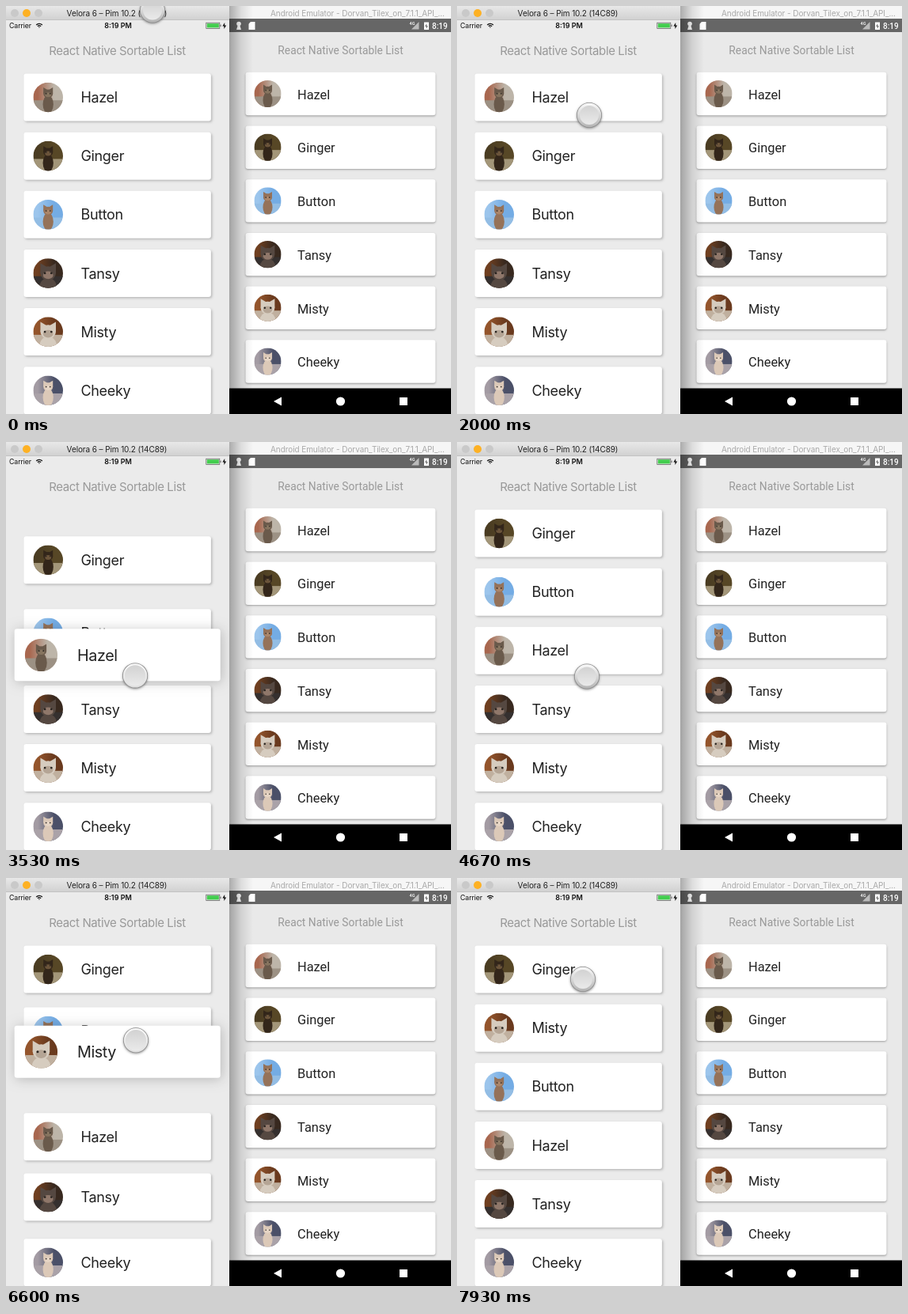
An HTML page with a canvas for the animation above (8 s loop, 562x516 px).

```html
<!DOCTYPE html>
<html lang="en">
<head>
<meta charset="utf-8">
<title>Sortable list</title>
<style>
  html, body { margin: 0; width: 100%; height: 100%; overflow: hidden; background: #ebebeb; }
  canvas { display: block; }
</style>
</head>
<body>
<canvas id="stage" width="562" height="516"></canvas>
<script>
const ctx = document.getElementById('stage').getContext('2d');
const LOOP = 8000, TAU = Math.PI * 2, EDGE = 282, SHIFT = 300;
const SANS = 'Inter, sans-serif', ROBOTO = 'Roboto, sans-serif';
const slot = i => 115.5 + 74.15 * i;

// A track is a start value and steps of [start, end, value].
const clamp = u => Math.max(0, Math.min(1, u));
const ease = u => u < .5 ? 2 * u * u : 1 - 2 * (1 - u) ** 2;
const track = (t, from, steps) => steps.reduce(
  (v, [a, b, to]) => v + (to - v) * ease(clamp((t - a) / (b - a))), from);

function bounce(u) {
  if (u < 1 / 2.75) return 7.5625 * u * u;
  const [mid, base] = u < 2 / 2.75 ? [1.5, .75] : u < 2.5 / 2.75 ? [2.25, .9375] : [2.625, .984375];
  u -= mid / 2.75;
  return 7.5625 * u * u + base;
}

const cats = [
  { name: 'Hazel', wall: '#bdb5a9', side: '#a8674f', floor: '#9c9184', fur: '#6a5a4b', face: '#86745f', sits: true },
  { name: 'Ginger', wall: '#574726', side: '#4a3c22', floor: '#a39679', fur: '#33261a', face: '#6b543a', sits: true },
  { name: 'Button', wall: '#74ace4', side: '#9cc5ec', floor: '#93bde4', fur: '#957259', face: '#ab866a', sits: true },
  { name: 'Tansy', wall: '#38291f', side: '#6f3f20', floor: '#35302f', fur: '#554841', face: '#8f776a' },
  { name: 'Misty', wall: '#6a3a1e', side: '#94552c', floor: '#c0b09f', fur: '#d6ccbf', face: '#b5a595' },
  { name: 'Cheeky', wall: '#4b5068', side: '#a39ba3', floor: '#aaa2a8', fur: '#dcc9b8', face: '#e6d5c5', sits: true }
];

// Each drag lifts the card in one slot; the cards it passes step aside at the swap times.
const drags = [
  { from: 0, to: 2, lift: 2570, drop: 4050, swaps: [3374, 3414], path: [[3060, 3626, 278.5]] },
  { from: 4, to: 1, lift: 5610, drop: 7250, swaps: [6373, 6382, 6553],
    path: [[6100, 6250, 330], [6250, 6705, 207]] }
];
const order = [...cats];
cats.forEach(cat => cat.steps = []);
for (const d of drags) {
  const dir = Math.sign(d.to - d.from);
  d.cat = order[d.from];
  d.cat.steps.push(...d.path, [d.drop, d.drop + SHIFT, slot(d.to)]);
  d.swaps.forEach((at, i) => {
    const s = d.from + dir * i;
    order[s] = order[s + dir];
    order[s].steps.push([at, at + SHIFT, slot(s)]);
  });
  order[d.to] = d.cat;
}
const raised = (d, t) => bounce(clamp((t - d.lift) / SHIFT)) - bounce(clamp((t - d.drop) / SHIFT));

const ballPath = [ // start, end, x, y
  [60, 200, 246, 5], [370, 930, 167, 142], [1370, 1470, 167, 138], [1990, 2270, 167, 135],
  [3030, 3580, 163, 298], [4050, 4300, 164, 296], [4640, 5270, 165, 408],
  [6010, 6160, 165, 318], [6160, 6650, 164, 203], [7500, 7930, 159, 128]
];
const ballX = ballPath.map(([a, b, x]) => [a, b, x]);
const ballY = ballPath.map(([a, b, , y]) => [a, b, y]);

function rect(x, y, w, h, fill) {
  ctx.fillStyle = fill;
  ctx.fillRect(x, y, w, h);
}
function oval(x, y, rx, ry, fill) {
  ctx.fillStyle = fill;
  ctx.beginPath();
  ctx.ellipse(x, y, rx, ry, 0, 0, TAU);
  ctx.fill();
}
const disc = (x, y, r, fill) => oval(x, y, r, r, fill);
function poly(fill, ...pts) {
  ctx.fillStyle = fill;
  ctx.beginPath();
  for (let i = 0; i < pts.length; i += 2) ctx.lineTo(pts[i], pts[i + 1]);
  ctx.fill();
}
function text(str, x, y, font, fill, align = 'left', spacing = 0) {
  ctx.font = font;
  ctx.fillStyle = fill;
  ctx.textAlign = align;
  ctx.letterSpacing = spacing + 'px';
  ctx.fillText(str, x, y);
}
function ramp(x0, y0, x1, y1, ...colors) {
  const g = ctx.createLinearGradient(x0, y0, x1, y1);
  colors.forEach((c, i) => g.addColorStop(i / (colors.length - 1), c));
  return g;
}
function panel(x, y, w, h, dx, dy, blur, shade) {
  ctx.save();
  ctx.shadowColor = shade;
  ctx.shadowBlur = blur;
  ctx.shadowOffsetX = dx;
  ctx.shadowOffsetY = dy;
  ctx.fillStyle = '#fff';
  ctx.beginPath();
  ctx.roundRect(x, y, w, h, 3);
  ctx.fill();
  ctx.restore();
}
function bolt(x, y, s, fill) {
  poly(fill, x + s * .1, y - s, x - s * .6, y + s * .1, x - s * .1, y + s * .1,
    x - s * .1, y + s, x + s * .6, y - s * .1, x + s * .1, y - s * .1);
}

function avatar({ wall, side, floor, fur, face, sits }, x, y, r) {
  const s = sits ? .32 : .52;
  ctx.save();
  ctx.translate(x, y);
  ctx.scale(r, r);
  ctx.beginPath();
  ctx.arc(0, 0, 1, 0, TAU);
  ctx.clip();
  rect(-1, -1, 2, 2, ramp(-.7, 0, .4, 0, side, wall));
  rect(-1, .2, 2, .8, floor);
  ctx.translate(0, sits ? -.25 : 0);
  oval(0, s + .4, s * 1.1, .6, fur);
  for (const d of [-1, 1]) poly(fur, d * s, -s * 1.3, d * s, 0, 0, -s * .7);
  oval(0, 0, s, s * .9, fur);
  oval(0, s * .25, s * .65, s * .5, face);
  for (const d of [-1, 1]) disc(d * s * .42, 0, s * .14, '#28231f');
  ctx.restore();
}

function iosRow(cat, t) {
  const i = cats.indexOf(cat);
  const up = drags.reduce((sum, d) => sum + (d.cat === cat ? raised(d, t) : 0), 0);
  ctx.save();
  ctx.translate(140.7, track(t, slot(i), cat.steps));
  ctx.scale(1 + up * .1, 1 + up * .1);
  panel(-118.2, -30, 236.4, 60, 1.5, 1.5, 3 + 12 * up, 'rgba(0,0,0,.22)');
  avatar(cat, -87.5, 0, 18.8);
  text(cat.name, -46.2, 6.6, '18px ' + SANS, '#222', 'left', -.35);
  ctx.restore();
}

function iosBars() {
  rect(0, 0, EDGE, 18, ramp(0, 0, 0, 18, '#e8e8e8', '#d0d0d0'));
  rect(0, 17, EDGE, 1, '#c2c2c2');
  ['#c9c9c9', '#fdb124', '#c9c9c9'].forEach((c, i) => disc(11 + 15 * i, 9, 5, c));
  text('Velora 6 – Pim 10.2 (14C89)', 140, 12.6, '10px ' + SANS, '#222', 'center', -.1);

  text('Carrier', 4, 28, '8.8px ' + SANS, '#111', 'left', -.1);
  ctx.strokeStyle = '#111';
  ctx.lineWidth = 1.3;
  for (const r of [.6, 2.8, 5.2]) {
    ctx.beginPath();
    ctx.arc(42, 27.6, r, -TAU * .38, -TAU * .12);
    ctx.stroke();
  }
  text('8:19 PM', 141.5, 28.2, '600 9px ' + SANS, '#111', 'center');
  ctx.strokeStyle = '#555';
  ctx.lineWidth = .7;
  ctx.strokeRect(252.8, 21.2, 17, 7.2);
  rect(253.8, 22.2, 15, 5.2, '#42cd4e');
  rect(270.5, 23.5, 1, 2.6, '#555');
  bolt(275.8, 25, 4, '#111');
}

function android() {
  const mid = 422.5;
  rect(EDGE, 0, 280, 516, '#e9e9e9');
  rect(EDGE, 0, 280, 16, '#f6f6f6');
  text('Android Emulator - Dorvan_Tilex_on_7.1.1_API_...', 334, 12.6, '10px ' + SANS, '#a9a9a9', 'left', -.08);
  rect(EDGE, 16, 280, 17, '#666');

  disc(294, 22.5, 2.8, '#fff');
  poly('#fff', 294, 20, 297, 30, 291, 30);
  rect(306.5, 20, 8, 10, '#fff');
  poly('#666', 306, 19, 310, 19, 306, 23);
  text('4G', 509.5, 24, '500 5.5px ' + ROBOTO, '#fff');
  poly('#bbb', 521.5, 20, 521.5, 29.5, 512, 29.5);
  rect(528, 20.5, 6, 9.5, '#fff');
  bolt(531, 25.5, 3.2, '#666');
  text('8:19', 538, 28.6, '500 10px ' + ROBOTO, '#fff');

  text('React Native Sortable List', mid, 61.2, '13.8px ' + ROBOTO, '#999', 'center');
  cats.forEach((cat, i) => {
    const y = 111 + 67.7 * i;
    panel(mid - 120, y - 27.2, 240, 54.4, 0, 1.2, 2.4, 'rgba(0,0,0,.32)');
    avatar(cat, 330.5, y, 17.1);
    text(cat.name, 368, y + 6.7, '16.4px ' + ROBOTO, '#222');
  });

  rect(EDGE, 483.5, 280, 33, '#000');
  poly('#fff', 338, 500, 348, 494.5, 348, 505.5);
  disc(mid, 500, 5.6, '#fff');
  rect(497, 495, 10, 10, '#fff');
  rect(EDGE, 0, 30, 516,
    ramp(EDGE, 0, EDGE + 30, 0, 'rgba(0,0,0,.3)', 'rgba(0,0,0,.1)', 'rgba(0,0,0,0)'));
}

function ball(t) {
  const x = track(t, 185, ballX), y = track(t, 5.5, ballY);
  const pressed = drags.some(d => t > d.lift - SHIFT && t < d.drop);
  const r = pressed ? 13.2 : 12;
  ctx.save();
  ctx.shadowColor = 'rgba(0,0,0,.4)';
  ctx.shadowBlur = 3;
  ctx.shadowOffsetY = 1;
  disc(x, y, 16, '#8c8c8c');
  ctx.restore();
  disc(x, y, 15.2, ramp(0, y - 15, 0, y + 15, '#fafafa', pressed ? '#dedede' : '#b4b4b4'));
  disc(x, y, r, ramp(0, y - r, 0, y + r, '#d2d2d2', '#eaeaea'));
}

function draw(t) {
  android();
  ctx.save();
  ctx.beginPath();
  ctx.rect(0, 0, EDGE, 516);
  ctx.clip();
  rect(0, 0, EDGE, 516, '#ebebeb');
  text('React Native Sortable List', 140.5, 62, '15px ' + SANS, '#999', 'center', -.38);
  const top = drags[t < drags[1].lift ? 0 : 1].cat;
  for (const cat of cats) if (cat !== top) iosRow(cat, t);
  iosRow(top, t);
  iosBars();
  ctx.restore();
  ball(t);
}

function frame(now) {
  draw(now % LOOP);
  requestAnimationFrame(frame);
}
requestAnimationFrame(frame);
</script>
</body>
</html>
```
